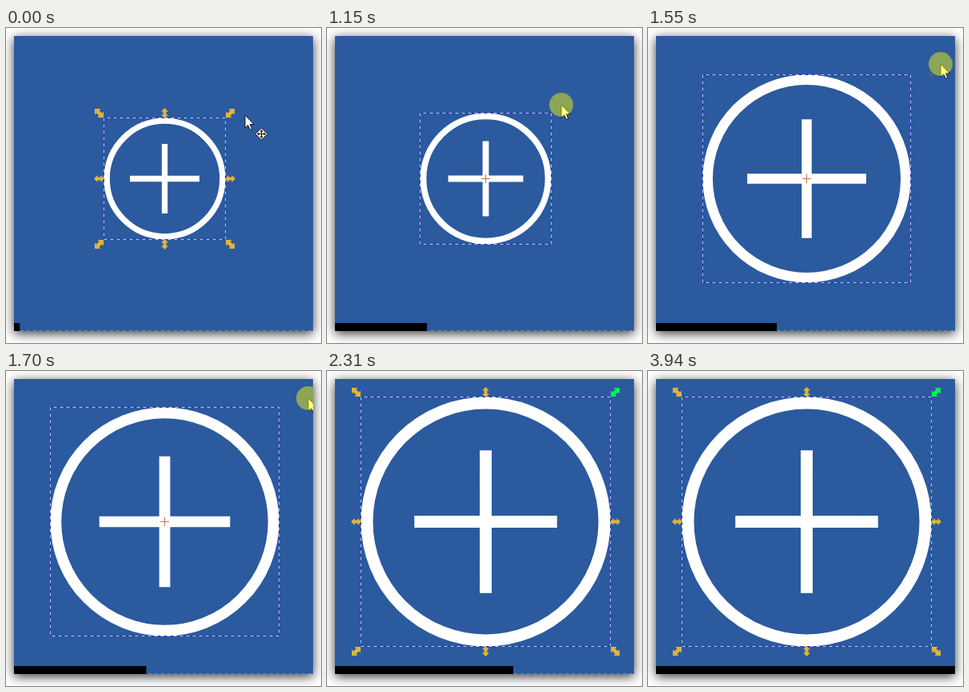
These frames come from a looping animation (394 by 394 pixels, 4.01 s). An HTML page with a canvas:

```html
<!DOCTYPE html>
<html lang="en">
<head>
<meta charset="utf-8">
<title>Scaling an icon</title>
<style>
html, body { margin: 0; width: 100%; height: 100%; overflow: hidden; background: #fff; }
canvas { display: block; width: 394px; height: 394px; }
</style>
</head>
<body>
<canvas id="stage" width="394" height="394"></canvas>
<script>
const ctx = document.getElementById('stage').getContext('2d');
const LOOP = 4010, STEPS = 52;
const PAGE = { x: 10, y: 10, w: 374, h: 369 };
const CX = 198.5, CY = 188.5;
const BLUE = '#2b5a9f', GOLD = '#e0b53a', GREEN = '#08ee5c';

// Step at which each phase of the drag begins
const HOVER = 5, PRESS = 12, DRAG = 15, RELEASE = 30;

// Start and last change of every run of seven steps, in ms
const RUNS = [[70, 540], [620, 1080], [1150, 1640], [1700, 2180],
  [2240, 2710], [2790, 3250], [3320, 3790], [3860, 4340]];

// step, pointer x, pointer y, half size of the selection
const TRACK = [
  [0, 299, 109, 76], [6, 284, 102, 76], [14, 284, 102, 76],
  [15, 293, 96, 82], [17, 332, 70, 108], [20, 366, 45, 130],
  [21, 372, 38, 137], [22, 378, 34, 143], [25, 390, 25, 153],
  [27, 393, 22, 156], [52, 393, 22, 156]
];

function stepAt(t) {
  if (t < RUNS[0][0]) return 0;
  let run = 0;
  while (run < RUNS.length - 1 && t >= RUNS[run + 1][0]) run++;
  const [start, end] = RUNS[run];
  const k = Math.floor((t - start + 11) / ((end - start) / 6));
  return Math.min(STEPS - 1, 1 + run * 7 + Math.min(6, k));
}

function poseAt(n) {
  let i = 0;
  while (i < TRACK.length - 2 && n >= TRACK[i + 1][0]) i++;
  const a = TRACK[i], b = TRACK[i + 1];
  const p = (n - a[0]) / (b[0] - a[0]);
  const [, x, y, half] = a.map((v, j) => v + (b[j] - v) * p);
  return { x, y, half };
}

function poly(points) {
  ctx.beginPath();
  points.forEach(([x, y]) => ctx.lineTo(x, y));
  ctx.closePath();
}

function drawPage() {
  const { x, y, w, h } = PAGE;
  ctx.fillStyle = '#fff';
  ctx.fillRect(0, 0, 394, 394);
  ctx.save();
  ctx.shadowColor = 'rgba(0,0,0,.8)';
  ctx.shadowBlur = 13;
  ctx.shadowOffsetY = 3;
  ctx.fillStyle = BLUE;
  ctx.fillRect(x, y, w, h);
  ctx.restore();
  ctx.fillStyle = BLUE;
  ctx.fillRect(x, y, w, h);
  ctx.save();
  ctx.strokeStyle = '#7189b0';
  ctx.setLineDash([4, 4]);
  ctx.beginPath();
  ctx.moveTo(x, y + h - .5);
  ctx.lineTo(x + w, y + h - .5);
  ctx.stroke();
  ctx.restore();
}

function drawIcon(half) {
  const thick = half * .096, arm = half * .572;
  ctx.strokeStyle = '#fff';
  ctx.lineWidth = thick;
  ctx.beginPath();
  ctx.arc(CX, CY, half - thick / 2, 0, Math.PI * 2);
  ctx.moveTo(CX - arm, CY);
  ctx.lineTo(CX + arm, CY);
  ctx.moveTo(CX, CY - arm);
  ctx.lineTo(CX, CY + arm);
  ctx.stroke();
  ctx.lineWidth = 1;
}

function drawSelection(half) {
  const r = Math.round(half);
  ctx.save();
  ctx.setLineDash([4, 4]);
  [['#2c2cb4', 0], ['#b5c6e8', 4]].forEach(([color, offset]) => {
    ctx.strokeStyle = color;
    ctx.lineDashOffset = offset;
    ctx.strokeRect(CX - r, CY - r, 2 * r, 2 * r);
  });
  ctx.restore();
}

function drawHandle(dx, dy, dist, color) {
  const size = dx && dy ? 1.2 : 1;
  ctx.save();
  ctx.translate(CX + dx * dist, CY + dy * dist);
  ctx.rotate(Math.atan2(dy, dx));
  ctx.scale(size, size);
  poly([[-6.5, 0], [-2, -4.5], [-2, -2], [2, -2], [2, -4.5],
    [6.5, 0], [2, 4.5], [2, 2], [-2, 2], [-2, 4.5]]);
  ctx.fillStyle = color;
  ctx.fill();
  ctx.restore();
}

function drawHandles(half, hot) {
  for (let dx = -1; dx <= 1; dx++)
    for (let dy = -1; dy <= 1; dy++)
      if (dx || dy) drawHandle(dx, dy, half + 6, hot && dx > 0 && dy < 0 ? GREEN : GOLD);
}

function drawCenter() {
  ctx.strokeStyle = '#c9714f';
  ctx.beginPath();
  ctx.moveTo(CX - 5.5, CY);
  ctx.lineTo(CX + 5.5, CY);
  ctx.moveTo(CX, CY - 5.5);
  ctx.lineTo(CX, CY + 5.5);
  ctx.stroke();
}

function drawSnap(x, y) {
  ctx.strokeStyle = '#5f7a62';
  ctx.beginPath();
  ctx.moveTo(x - 3.5, y - 3.5);
  ctx.lineTo(x + 3.5, y + 3.5);
  ctx.moveTo(x + 3.5, y - 3.5);
  ctx.lineTo(x - 3.5, y + 3.5);
  ctx.stroke();
}

function drawArrow(x, y) {
  ctx.save();
  ctx.translate(x, y);
  poly([[0, 0], [0, 16], [3.7, 12.6], [6.4, 18.4], [8.8, 17.3], [6.2, 11.6], [11, 11.4]]);
  ctx.fillStyle = '#fff';
  ctx.fill();
  ctx.strokeStyle = '#111';
  ctx.stroke();
  ctx.restore();
}

function drawMoveSign(x, y) {
  ctx.save();
  ctx.translate(x, y);
  poly([[-7.5, 0], [0, -7.5], [7.5, 0], [0, 7.5]]);
  ctx.fillStyle = '#fff';
  ctx.fill();
  ctx.strokeStyle = ctx.fillStyle = '#111';
  ctx.stroke();
  ctx.fillRect(-4, -.5, 8, 1);
  ctx.fillRect(-.5, -4, 1, 8);
  for (let i = 0; i < 4; i++) {
    poly([[5.5, 0], [3, -2.2], [3, 2.2]]);
    ctx.fill();
    ctx.rotate(Math.PI / 2);
  }
  ctx.restore();
}

function drawPointer(n, x, y) {
  drawArrow(x, y);
  if (n < HOVER) drawMoveSign(x + 20.5, y + 23.5);
  if (n >= PRESS) {
    ctx.fillStyle = 'rgba(255,255,0,.46)';
    ctx.beginPath();
    ctx.arc(x, y, 15, 0, Math.PI * 2);
    ctx.fill();
  }
}

function draw(t) {
  const n = stepAt(t);
  const { x, y, half } = poseAt(n);
  const dragging = n >= DRAG && n < RELEASE;
  drawPage();
  ctx.save();
  ctx.beginPath();
  ctx.rect(PAGE.x, PAGE.y, PAGE.w, PAGE.h);
  ctx.clip();
  drawIcon(half);
  drawSelection(half);
  if (dragging) drawCenter();
  else drawHandles(half, n >= HOVER);
  if (n >= 19 && n <= 21) drawSnap(x - 11.5, y + 14);
  if (n < RELEASE) drawPointer(n, x, y);
  ctx.fillStyle = '#000';
  ctx.fillRect(PAGE.x, 369, PAGE.w * (n + 1) / STEPS, 10);
  ctx.restore();
}

const began = performance.now();
function tick() {
  draw((performance.now() - began) % LOOP);
  requestAnimationFrame(tick);
}
tick();
</script>
</body>
</html>
```
